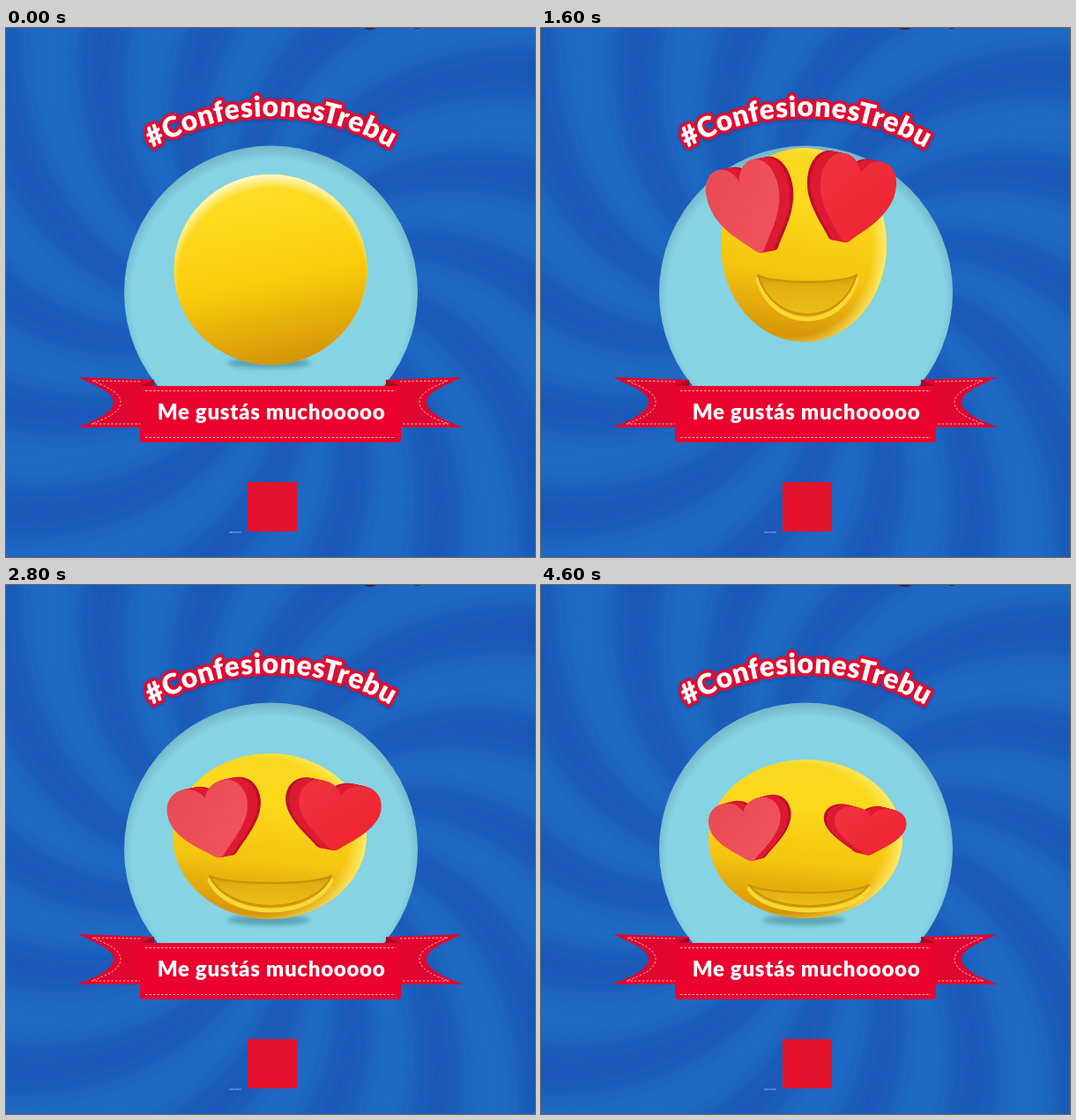
An HTML page that plays this animation: 600x600 px, repeating every 4.7 s.

```html
<!DOCTYPE html>
<html lang="es">
<head>
<meta charset="utf-8">
<title>Confesiones</title>
<style>
html, body { margin: 0; width: 100%; height: 100%; overflow: hidden; background: #1e66c2; }
svg { display: block; width: 100vw; height: 100vh; }
text { font-family: Lato, "Open Sans", sans-serif; font-weight: 900; fill: #fff; }
</style>
</head>
<body>
<svg viewBox="0 0 600 600">
  <defs>
    <filter id="soft" x="-20%" y="-20%" width="140%" height="140%"><feGaussianBlur stdDeviation="12"/></filter>
    <filter id="blur" x="-50%" y="-50%" width="200%" height="200%"><feGaussianBlur stdDeviation="2.5"/></filter>
    <filter id="drop" x="-10%" y="-20%" width="120%" height="150%"><feDropShadow dx="0" dy="1" stdDeviation="1.5" flood-color="#0a2c70" flood-opacity=".4"/></filter>
    <radialGradient id="disc" cx=".5" cy=".52" r=".52">
      <stop offset=".91" stop-color="#85d3e3"/><stop offset="1" stop-color="#74b4c9"/>
    </radialGradient>
    <linearGradient id="skin" x1=".56" y1="0" x2=".44" y2="1">
      <stop offset="0" stop-color="#f6d822"/><stop offset=".3" stop-color="#fdd81c"/>
      <stop offset=".65" stop-color="#f5c410"/><stop offset="1" stop-color="#d49208"/>
    </linearGradient>
    <radialGradient id="glow" cx=".44" cy=".5" r=".56">
      <stop offset=".84" stop-color="#fff07a" stop-opacity="0"/><stop offset="1" stop-color="#fff07a" stop-opacity=".85"/>
    </radialGradient>
    <linearGradient id="plain" x1=".4" y1="0" x2=".6" y2="1">
      <stop offset="0" stop-color="#ffe02c"/><stop offset=".55" stop-color="#fbcd0b"/>
      <stop offset="1" stop-color="#d39309"/>
    </linearGradient>
    <radialGradient id="rim" cx=".51" cy=".56" r=".56">
      <stop offset=".87" stop-color="#fffbd0" stop-opacity="0"/><stop offset="1" stop-color="#fffbd0"/>
    </radialGradient>
    <linearGradient id="mouthFill" x1="0" y1="0" x2="0" y2="1">
      <stop offset="0" stop-color="#cf980a"/><stop offset=".3" stop-color="#e2b012"/><stop offset="1" stop-color="#ecbf18"/>
    </linearGradient>
    <linearGradient id="frontL" x1="0" y1="0" x2="1" y2="1">
      <stop offset="0" stop-color="#e84a52"/><stop offset="1" stop-color="#f25560"/>
    </linearGradient>
    <linearGradient id="frontR" x1="0" y1="0" x2="1" y2="1">
      <stop offset="0" stop-color="#ee3540"/><stop offset="1" stop-color="#f0212f"/>
    </linearGradient>
    <path id="heart" d="M.11 .94Q0 1.04-.11 .94C-.35 .68-1 .25-1-.35C-1-1.06-.2-1.12 0-.58C.2-1.12 1-1.06 1-.35C1 .25 .35 .68 .11 .94Z"/>
    <path id="arc" d="M158 141A270 270 0 0 1 444 141"/>
    <g id="tail">
      <path d="M82 396L168 399V453H80C100 446 122 436 122 424.500C122 412 100 406 82 396Z" fill="#e0062f"/>
      <path d="M152 406L168 399V406Z" fill="#a80724"/>
      <path d="M152 401L98 400C114 407 130 413 130 424.500C130 436 114 443 97 449H152" fill="none" stroke="#f7b9c2" stroke-dasharray="2.500 2"/>
    </g>
  </defs>

  <rect width="600" height="600" fill="#206ac4"/>
  <g id="swirl" fill="#1b56b6" filter="url(#soft)"></g>
  <g fill="#3b2638"><ellipse cx="413" cy="-2" rx="8" ry="4"/><ellipse cx="466" cy="-3" rx="6" ry="4"/></g>

  <circle cx="300.5" cy="300" r="166.5" fill="url(#disc)"/>
  <g id="emoji">
    <ellipse id="shadow" cx="298" cy="380" rx="47" ry="6" fill="#4a8c9c" filter="url(#blur)"/>
    <g id="ball"><ellipse fill="url(#skin)"/><ellipse fill="url(#glow)"/></g>
    <g id="blank"><ellipse fill="url(#plain)"/><ellipse fill="url(#rim)"/></g>
    <g id="mouth">
      <path id="lip" fill="none" stroke="#f8d832" stroke-width="5" stroke-linecap="round"/>
      <path id="smile" fill="url(#mouthFill)" stroke="#c9920c" stroke-width="2" stroke-linejoin="round"/>
    </g>
    <g id="left"></g>
    <g id="right"></g>
  </g>

  <use href="#tail"/>
  <use href="#tail" transform="matrix(-1 0 0 1 599 0)"/>
  <rect x="152" y="406" width="296" height="64" rx="4" fill="#ea032e"/>
  <path d="M158 411.500H442M158 464.500H442" stroke="#f7b9c2" stroke-dasharray="2.500 2"/>
  <text x="301" y="444" text-anchor="middle" font-size="24" letter-spacing=".7">Me gustás muchooooo</text>

  <text font-size="32" letter-spacing=".5" text-anchor="middle" stroke="#df0b31" stroke-width="7"
    stroke-linejoin="round" paint-order="stroke" filter="url(#drop)"><textPath href="#arc" startOffset="50%">#ConfesionesTrebu</textPath></text>

  <rect x="274" y="515" width="56" height="56" fill="#e5132d"/>
  <text x="253" y="573" font-size="4" style="font-weight:400;fill:#b9cdec">anuncio</text>
</svg>
<script>
const LOOP = 4700, STEP = 100, BOUNCE = 1000 / 3;
const $ = id => document.getElementById(id);
const set = (el, attrs) => { for (const k in attrs) el.setAttribute(k, attrs[k]); };
const clamp = x => Math.max(0, Math.min(1, x));
const mix = (a, b, k) => a.map((v, i) => v + (b[i] - v) * k);
const svg = (tag, parent, attrs) => {
  const el = document.createElementNS("http://www.w3.org/2000/svg", tag);
  set(el, attrs);
  return parent.appendChild(el);
};

// ball: x, y, rx, ry | hearts: x, y, half width, half height, tilt, depth | mouth: x, y, half width, upper dip, lower dip
const HIGH = [298, 246, 94, 110, 234, 204, 41, 54, -17, 16, 356, 194, 43, 51, 13, -15, 302, 280, 56, 8, 45];
const MID = [299, 268, 106, 104, 235, 224, 45, 47, -15, 12, 367, 216, 45, 43, 15, -15, 302, 295, 64, 8, 46];
const LOW = [299, 285, 110, 94, 232, 267, 46, 44, -14, 15, 377, 262, 47, 40, 8, -15, 300, 330, 69, 8, 34];
const END = [300, 288, 110, 90, 233, 278, 41, 36, -10, 12, 373, 279, 41, 28, 4, -12, 304, 340, 68, 9, 24];
const START = [300, 274, 109.500, 108, ...LOW.slice(4)];
const TOP = mix(HIGH, MID, -.65), BOTTOM = mix(MID, LOW, 1.2);
const STOPS = [[1, TOP], [.309, HIGH], [-.309, MID], [-.809, LOW], [-1, BOTTOM]];

function bouncePose(t) {
  const h = Math.cos(2 * Math.PI * t / BOUNCE);
  let i = 0;
  while (i < STOPS.length - 2 && h < STOPS[i + 1][0]) i++;
  const [a, from] = STOPS[i], [b, to] = STOPS[i + 1];
  return mix(from, to, (a - h) / (a - b));
}

function drawSwirl() {
  const arms = 14, edge = (start, r) => {
    const a = start + r / 430 * 1.05;
    return `${(300 + r * Math.cos(a)).toFixed(1)} ${(300 + r * Math.sin(a)).toFixed(1)}`;
  };
  for (let i = 0; i < arms; i++) {
    const a = i / arms * 2 * Math.PI + .05, pts = [];
    for (let r = 60; r <= 480; r += 30) pts.push(edge(a, r));
    for (let r = 480; r >= 60; r -= 30) pts.push(edge(a + .2, r));
    svg("path", $("swirl"), { d: `M${pts.join("L")}Z`, opacity: .9 });
  }
}

function buildHeart(id, front) {
  const layers = 9;
  for (let i = 0; i < layers; i++) {
    const face = i === layers - 1;
    svg("use", $(id), { href: "#heart", fill: face ? front : i < 2 ? "#bd1029" : "#dd1a32" });
  }
}

function placeHeart(id, [x, y, w, h, tilt, depth], size) {
  const layers = [...$(id).children];
  layers.forEach((el, i) => {
    const back = 1 - i / (layers.length - 1);
    set(el, { transform: `translate(${x + depth * back * size} ${y - 3 * back}) rotate(${tilt}) scale(${w * size} ${h * size})` });
  });
  set($(id), { visibility: size > 0 ? "visible" : "hidden" });
}

function draw(t) {
  const grow = clamp(t / 400);
  let p = mix(START, bouncePose(t), grow);
  p = mix(p, END, clamp((t - 4200) / 400));
  const [cx, cy, rx, ry] = p, [mx, my, w, up, down] = p.slice(16);
  for (const el of [...$("ball").children, ...$("blank").children]) set(el, { cx, cy, rx, ry });
  set($("blank"), { opacity: clamp(1 - grow * 2) });
  set($("shadow"), { opacity: clamp((cy + ry - 360) / 20) * .7 });

  const curve = (dip, dir) => `C${mx - dir * w * .7} ${my + dip * 1.33} ${mx + dir * w * .7} ${my + dip * 1.33} ${mx + dir * w} ${my}`;
  set($("smile"), { d: `M${mx - w} ${my}${curve(up, 1)}${curve(down, -1)}Z` });
  const lipY = my + 5, lipDip = lipY + down * 1.33;
  set($("lip"), { d: `M${mx - w} ${lipY}C${mx - w * .7} ${lipDip} ${mx + w * .7} ${lipDip} ${mx + w} ${lipY}` });
  set($("mouth"), { opacity: grow });
  placeHeart("left", p.slice(4, 10), grow);
  placeHeart("right", p.slice(10, 16), grow);
}

drawSwirl();
buildHeart("left", "url(#frontL)");
buildHeart("right", "url(#frontR)");
const begin = performance.now();
function tick() {
  const t = (performance.now() - begin) % LOOP;
  draw(Math.floor(t / STEP) * STEP);
  requestAnimationFrame(tick);
}
tick();
</script>
</body>
</html>
```
